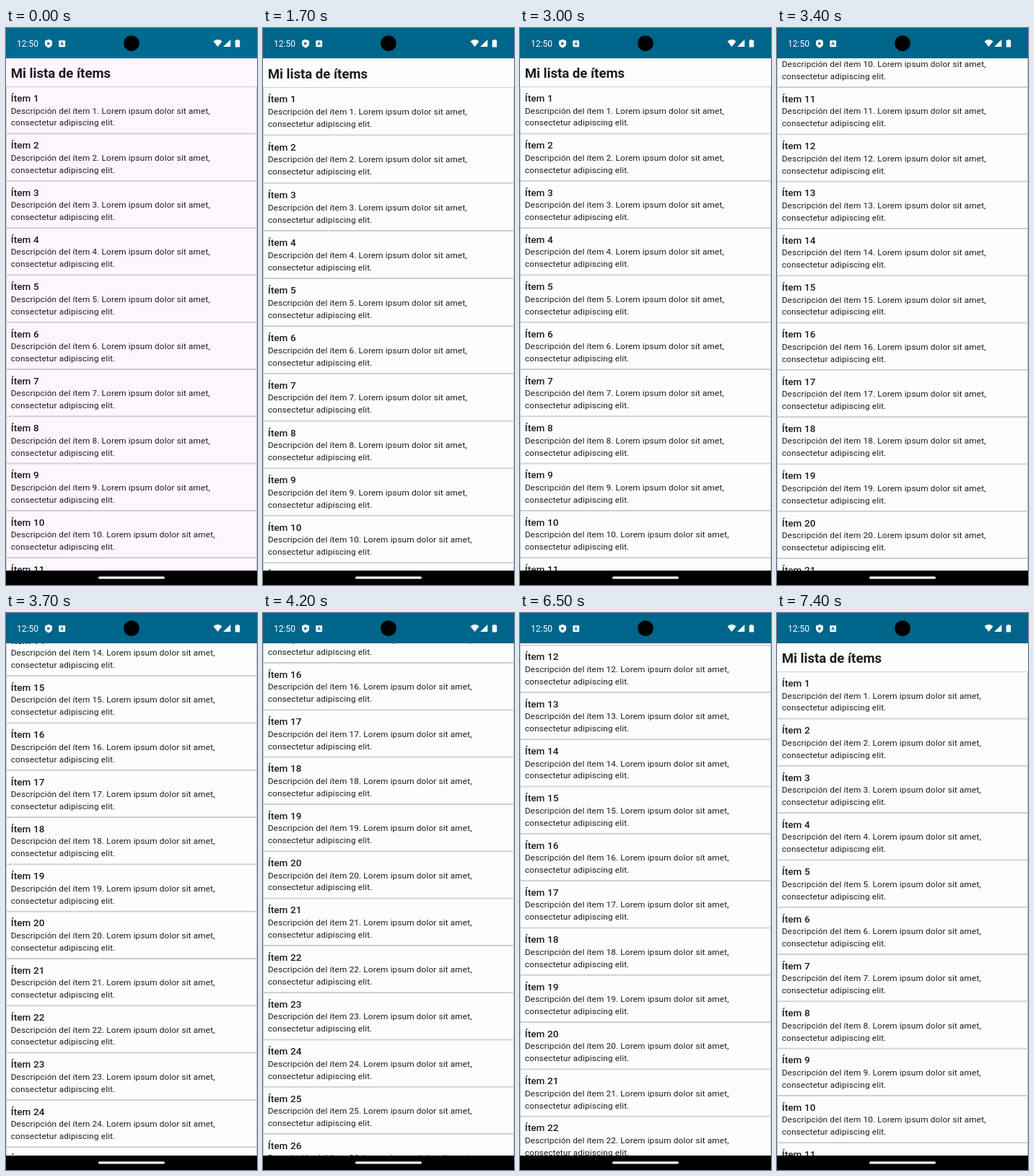
These frames come from a looping animation (348x772 px, 9000 ms). An HTML page with a canvas:

```html
<!DOCTYPE html>
<html lang="es">
<head>
<meta charset="utf-8">
<style>
  html, body { margin: 0; width: 100%; height: 100%; overflow: hidden; background: #000; }
  canvas { display: block; width: 348px; height: 772px; }
</style>
</head>
<body>
<canvas id="stage"></canvas>
<script>
const W = 348, H = 772, TOP = 42, BOTTOM = 752;
const LOOP = 9000, STEP = 100;
const FIRST = 81.2, PITCH = 65.3, ITEMS = 40;
const FLING = 3.69, REST = 992;

const canvas = document.getElementById('stage');
const ctx = canvas.getContext('2d');
const ratio = window.devicePixelRatio || 1;
canvas.width = W * ratio;
canvas.height = H * ratio;
ctx.scale(ratio, ratio);

const clamp = v => Math.min(1, Math.max(0, v));
const progress = (t, start, end) => clamp((t - start) / (end - start));
const fling = (t, start, end) => 1 - (1 - progress(t, start, end)) ** FLING;
const mix = (a, b, k) => `rgb(${a.map((v, i) => Math.round(v + (b[i] - v) * k))})`;

function scrollAt(t) {
  return Math.max(0, REST * fling(t, 3080, 4350) - 1300 * fling(t, 6415, 8015));
}

// Overscroll stretch: a quick pull, then a spring back to rest.
function stretchAt(t) {
  const pull = t < 1850 ? 14 * progress(t, 1550, 1850) * (t >= 1700)
                        : 14 * (1 - progress(t, 1850, 2700)) ** 2;
  const bounce = 6 * Math.sin(Math.PI * progress(t, 6930, 7400));
  return pull + bounce;
}

function text(str, x, y, font, spacing = 0) {
  ctx.font = font + ' Roboto, sans-serif';
  ctx.letterSpacing = spacing + 'px';
  ctx.fillText(str, x, y);
}

function disc(x, y, r) {
  ctx.beginPath();
  ctx.arc(x, y, r, 0, 7);
  ctx.fill();
}

function fillPath(d, color) {
  ctx.fillStyle = color;
  ctx.fill(new Path2D(d));
}

function drawList(t) {
  const scroll = scrollAt(t), stretch = stretchAt(t);
  const place = y => {
    const pos = y - scroll;
    return pos + stretch * (1 - (1 - clamp((pos - TOP) / (BOTTOM - TOP))) ** 2);
  };
  ctx.save();
  ctx.beginPath();
  ctx.rect(0, TOP, W, BOTTOM - TOP);
  ctx.clip();
  ctx.fillStyle = '#1c1b1f';
  ctx.strokeStyle = '#c8c8ca';
  ctx.lineWidth = 0.9;
  text('Mi lista de ítems', 6.7, place(69), 'bold 18.6px');
  for (let n = 1; n <= ITEMS; n++) {
    const y = FIRST + (n - 1) * PITCH;
    if (y - scroll > BOTTOM || y + PITCH - scroll < TOP) continue;
    const top = place(y), bottom = place(y + PITCH);
    ctx.strokeRect(0.45, top + 0.45, W - 0.9, bottom - top - 0.9);
    text(`Ítem ${n}`, 6.7, place(y + 20.8), '500 13.5px', 0.12);
    text(`Descripción del ítem ${n}. Lorem ipsum dolor sit amet,`, 6.7, place(y + 37.3), '11.83px', 0.12);
    text('consectetur adipiscing elit.', 6.7, place(y + 54.2), '11.83px', 0.12);
  }
  ctx.restore();
}

function drawStatusBar(color) {
  ctx.fillStyle = color;
  ctx.fillRect(0, 0, W, TOP);
  ctx.fillStyle = '#fff';
  text('12:50', 15, 25.8, '12px');
  fillPath('M59 15.8 L64 17.7 V21.5 Q64 25.8 59 27.5 Q54 25.8 54 21.5 V17.7 Z', '#fff');
  fillPath('M57.4 19 L61.6 21.6 L57.4 24.2 Z', color);
  ctx.fillStyle = '#fff';
  ctx.beginPath();
  ctx.roundRect(73.3, 17.2, 8.8, 9, 1);
  ctx.fill();
  ctx.fillStyle = color;
  text('A', 75.3, 24.4, 'bold 7px');
  fillPath('M287.6 18.4 Q293.6 13.8 299.6 18.4 L293.6 26 Z', '#fff');
  fillPath('M311.4 16 V26 H301.2 Z', '#fff');
  fillPath('M319.6 16 H322.4 V17 H324.2 V26.6 H317.8 V17 H319.6 Z', '#fff');
  ctx.fillStyle = '#000';
  disc(174, 21.2, 10.8);
}

function drawNavBar() {
  ctx.fillStyle = '#000';
  ctx.fillRect(0, BOTTOM, W, H - BOTTOM);
  ctx.fillStyle = '#fff';
  ctx.beginPath();
  ctx.roundRect(128, 760.2, 92, 3.4, 1.7);
  ctx.fill();
}

function frame(now) {
  const t = Math.floor(now % LOOP / STEP) * STEP;
  const settle = progress(t, 0, 1000);
  ctx.fillStyle = mix([253, 246, 254], [253, 252, 254], settle);
  ctx.fillRect(0, 0, W, H);
  drawList(t);
  drawStatusBar(mix([2, 106, 144], [0, 101, 138], settle));
  drawNavBar();
  requestAnimationFrame(frame);
}
requestAnimationFrame(frame);
</script>
</body>
</html>
```
